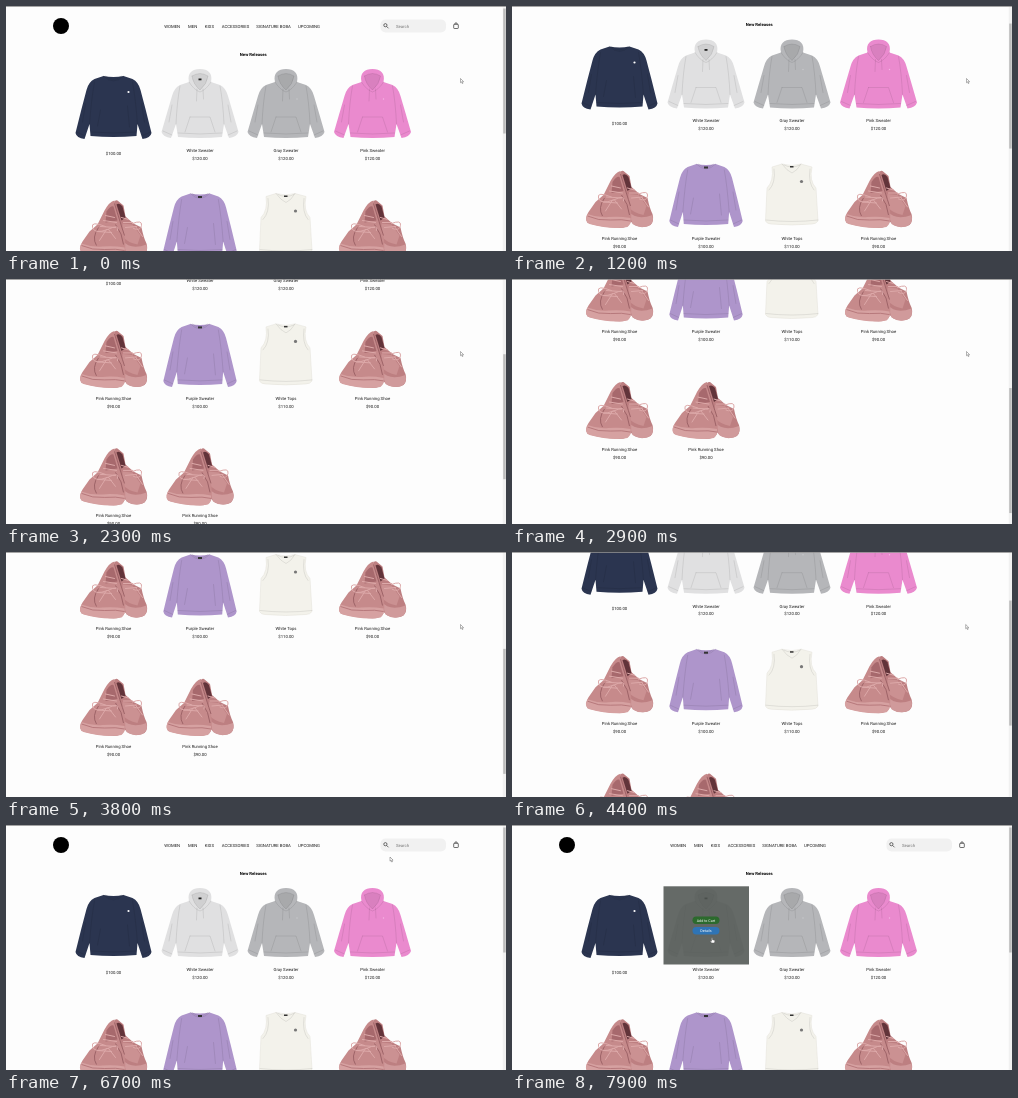
These frames come from a looping animation (500 px wide and 245 px high, 8 s). An HTML page:

```html
<!DOCTYPE html>
<html lang="en">
<head>
<meta charset="utf-8">
<title>Shop</title>
<style>
  html, body { margin: 0; width: 100%; height: 100%; overflow: hidden; background: #fdfdfd; }
  svg { display: block; width: 100vw; height: 100vh; }
  text { font: 4.25px Roboto, Arial, sans-serif; fill: #1c1c1c; text-rendering: geometricPrecision; }
  .mid { text-anchor: middle; }
  .bold { font-weight: 700; fill: #000; }
  .fold { fill: none; stroke: #000; stroke-opacity: .14; stroke-width: .6; stroke-linecap: round; }
  .lace { fill: none; stroke: #dda9a9; stroke-width: 1; stroke-linecap: round; }
</style>
</head>
<body>
<svg viewBox="0 0 500 245" preserveAspectRatio="none">
  <defs>
    <g id="crew">
      <path d="M-10 70Q0 72 10 70L19 73Q25 76 27 84L32 103 38 127Q37 132 29 133L24 118 23 130Q0 132-23 130L-24 118-29 133Q-37 132-38 127L-32 103-27 84Q-25 76-19 73Z"/>
      <path class="fold" d="M-10 70Q0 80 10 70M-8 70Q0 77 8 70M-23 126Q0 128 23 126M-37 126L-28 130M37 126L28 130M-19 76Q-22 92-24 118M19 76Q22 92 24 118M-13 104L-16 120M14 100L16 121M-28 98L-31 116M28 98L31 116"/>
    </g>
    <g id="hood">
      <path d="M-11 76C-13 67-8 63 0 63S13 67 11 76L20 79Q26 82 28 90L33 107 38.500 126Q37 131 29 132L24 118 22 131Q0 133-22 131L-24 118-29 132Q-37 131-38.500 126L-33 107-28 90Q-26 82-20 79Z"/>
      <path d="M-8 70Q0 65 8 70Q7 78 0 84Q-7 78-8 70Z" fill="#000" fill-opacity=".07"/>
      <path class="fold" d="M-11 76Q-6 84 0 86Q6 84 11 76M-8 70Q0 65 8 70Q7 78 0 84Q-7 78-8 70M-22 127Q0 129 22 127M-37 125L-28 129M37 125L28 129M-20 80Q-23 96-24 118M20 80Q23 96 24 118M-10 111H10L15 126M-10 111L-15 126M-28 99L-31 116M28 99L31 116"/>
      <path class="fold" d="M-3 83L-3.500 95M3 83L3.500 93"/>
    </g>
    <g id="vest">
      <path d="M-10 70Q0 73 9 70L20 73Q17 87 24 94L26 127Q24 130 20 130Q0 132-21 130Q-25 130-26.500 127L-25 94Q-18 87-20 73Z" fill="#f3f2eb" stroke="#e2e1d9" stroke-width=".5"/>
      <path class="fold" d="M-10 70Q-5 77 0 79Q5 77 9 70M-8 71Q0 75 8 71M-26 126Q0 129 26 126M-18 75Q-16 89-23 96M18 75Q16 89 22 96"/>
      <rect x="-2" y="72" width="3.500" height="1.500" fill="#333"/>
      <circle cx="9.500" cy="87.500" r="1.600" fill="#777"/>
    </g>
    <g id="shoe">
      <path d="M0 81Q1 76 4 77L10 82 12 93 20 100 28 104Q30 114 33 120Q35 127 31 131Q24 135 15 131L4 121Z" fill="#bd7f81"/>
      <path d="M3 81Q6 79 9 83L12 94 8 97Z" fill="#62343a"/>
      <path d="M9 117Q17 127 33 121Q35 129 29 132Q20 135 13 130Z" fill="#d09a9b"/>
      <path d="M9 100L19 101 27 112 24 121Q14 119 9 113Z" fill="#cb9192"/>
      <path class="lace" d="M8 94L15 96M10 99L19 99M12 104L23 103M19 100Q29 96 28 102T20 105M22 103L29 113"/>
      <path d="M-9 87Q-4 78 1 77L5 93 10 107Q13 120 11 129Q8 134 0 134Q-20 133-32 129Q-35 124-31 118L-24 108-16 101Z" fill="#c68a8b"/>
      <path d="M-7 88Q-3 82 0 83L4 97-8 99Z" fill="#a7696d"/>
      <path d="M-32 120Q-22 124-11 123T11 124Q12 130 8 133Q-8 136-30 130Q-36 127-32 120Z" fill="#d6a1a1"/>
      <path d="M-32 122Q-21 127-9 126T11 127" fill="none" stroke="#a9686c" stroke-width=".7"/>
      <path d="M2 101Q9 110 10 121M-15 104Q-22 114-17 122M1 80Q7 100 11 112" fill="none" stroke="#945a5f" stroke-width=".8"/>
      <path class="lace" d="M-8 92L1 94M-10 97L3 99M-13 103L2 104M-16 108L-2 109M-8 103Q-23 97-21 104T-6 106M-6 106Q7 100 4 107M-7 106L-14 117M-5 106L2 115"/>
    </g>
  </defs>
  <rect width="500" height="245" fill="#fdfdfd"/>
  <g id="page">
    <circle cx="55" cy="20" r="8"/>
    <g id="nav"></g>
    <rect x="374.500" y="13.500" width="65.500" height="13" rx="5" fill="#f1f1f1"/>
    <g fill="none" stroke="#333" stroke-width=".7">
      <circle cx="379.400" cy="19.200" r="1.600"/>
      <path d="M380.600 20.400L382.500 22.300"/>
      <rect x="447.700" y="18.300" width="4.600" height="4.200" rx=".6"/>
      <path d="M448.700 18.500Q448.700 16.800 450 16.800T451.300 18.500"/>
    </g>
    <text x="390" y="21.500" style="fill:#757575">Search</text>
    <text class="mid bold" x="247.300" y="49.500">New Releases</text>
    <g id="cards"></g>
    <g id="hover" opacity="0">
      <rect x="151.500" y="61.300" width="85.500" height="78.200" fill="#505653" fill-opacity=".88"/>
      <rect x="180.500" y="91.500" width="27" height="7.500" rx="3.700" fill="#2c6a2d"/>
      <rect x="180.500" y="102" width="27" height="7.500" rx="3.700" fill="#2f74b5"/>
      <text class="mid" x="194" y="96.600" style="fill:#fff;font-size:3.700px">Add to Cart</text>
      <text class="mid" x="194" y="107" style="fill:#fff;font-size:3.700px">Details</text>
    </g>
  </g>
  <rect x="496.800" width="3.200" height="245" fill="#f1f1f1"/>
  <rect id="thumb" x="497.200" width="2.500" height="125" fill="#bcbcbc"/>
  <rect width="500" height=".8" fill="#909090"/>
  <g id="cursor" stroke="#555" stroke-width=".45" stroke-linejoin="round" fill="#fff">
    <path id="arrow" d="M0 0V4.200L1 3.300 1.700 5 2.500 4.700 1.800 3.100H3.100Z"/>
    <path id="hand" d="M-.5-1.500Q0-2 .5-1.500V.2L2.500.8Q3 1 2.800 2L2.300 3.500H-.5L-1.900 1.500Q-1.700.8-.5 1.700Z"/>
  </g>
</svg>
<script>
const $ = id => document.getElementById(id);
const LOOP = 8000, STEP = 100, ROW = 117.5;
const cols = [107.5, 194, 280, 366.5];

const menu = [['WOMEN', 158.3], ['MEN', 182], ['KIDS', 198.8], ['ACCESSORIES', 215.8],
  ['SIGNATURE BOBA', 250.3], ['UPCOMING', 292]];
$('nav').innerHTML = menu.map(([s, x]) => `<text x="${x}" y="21.5">${s}</text>`).join('');

const shoe = ['shoe', '', 'Pink Running Shoe', '$90.00'];
const items = [
  ['crew', '#2b3550', '', '$100.00'],
  ['hood', '#e0e0e1', 'White Sweater', '$120.00'],
  ['hood', '#b5b6b9', 'Gray Sweater', '$120.00'],
  ['hood', '#ea8ace', 'Pink Sweater', '$120.00'],
  shoe,
  ['crew', '#ae95cb', 'Purple Sweater', '$100.00', .965],
  ['vest', '', 'White Tops', '$110.00'],
  shoe, shoe, shoe
];

// small chest and neck marks, by item index
const marks = {
  0: '<circle cx="15" cy="86" r="1.1" fill="#fff"/>',
  1: '<rect x="-1.500" y="72.500" width="3" height="1.800" fill="#222"/>',
  2: '<circle cx="11" cy="93" r=".7" fill="#c9cacc"/>',
  3: '<circle cx="11" cy="93" r=".7" fill="#f6b4e4"/>',
  5: '<rect x="-2" y="72.500" width="4" height="2" fill="#333"/>'
};

function card([shape, fill, name, price, wide = 1], i) {
  const y = name ? 153.8 : 148.8;
  return `<g transform="translate(${cols[i % 4]} ${Math.floor(i / 4) * ROW})">
    <use href="#${shape}" fill="${fill}" transform="scale(${wide} 1)"/>${marks[i] || ''}
    <text class="mid" y="145.9">${name}</text><text class="mid" y="${y}">${price}</text></g>`;
}
$('cards').innerHTML = items.map(card).join('');

// rows: time, then values
const scroll = [[800, 0], [900, 4], [1200, 29.5], [2000, 122], [2100, 122], [2200, 131],
  [2300, 142.6], [3000, 220], [3200, 235], [3500, 235], [3600, 220], [3800, 185], [4400, 90.3], [5000, 0]];
const pointer = [[4300, 454.5, 72.5], [4400, 453.7, 72.5], [4700, 440, 62], [5200, 384.5, 34],
  [5400, 384.5, 34], [6200, 382, 30], [6700, 384, 32], [7500, 385, 29], [7600, 255, 48],
  [7700, 205, 85], [7800, 200, 105], [7900, 200, 114.5]];
const shade = [[7600, 0], [7700, .6], [7800, 1]];

function at(rows, t) {
  const k = rows.findIndex(r => r[0] > t);
  if (k === 0) return rows[0].slice(1);
  if (k < 0) return rows[rows.length - 1].slice(1);
  const a = rows[k - 1], b = rows[k], p = (t - a[0]) / (b[0] - a[0]);
  return a.slice(1).map((v, i) => v + (b[i + 1] - v) * p);
}

function draw(now) {
  const t = Math.floor(now % LOOP / STEP) * STEP;
  const [top] = at(scroll, t), [x, y] = at(pointer, t), [dim] = at(shade, t);
  $('page').setAttribute('transform', `translate(0 ${-top})`);
  $('thumb').setAttribute('y', 2.5 + top * .51);
  $('cursor').setAttribute('transform', `translate(${x} ${y})`);
  $('hover').setAttribute('opacity', dim);
  const over = t >= 7800;
  $('hand').style.display = over ? '' : 'none';
  $('arrow').style.display = over ? 'none' : '';
}

const start = performance.now();
function tick() {
  draw(performance.now() - start);
  requestAnimationFrame(tick);
}
tick();
</script>
</body>
</html>
```
